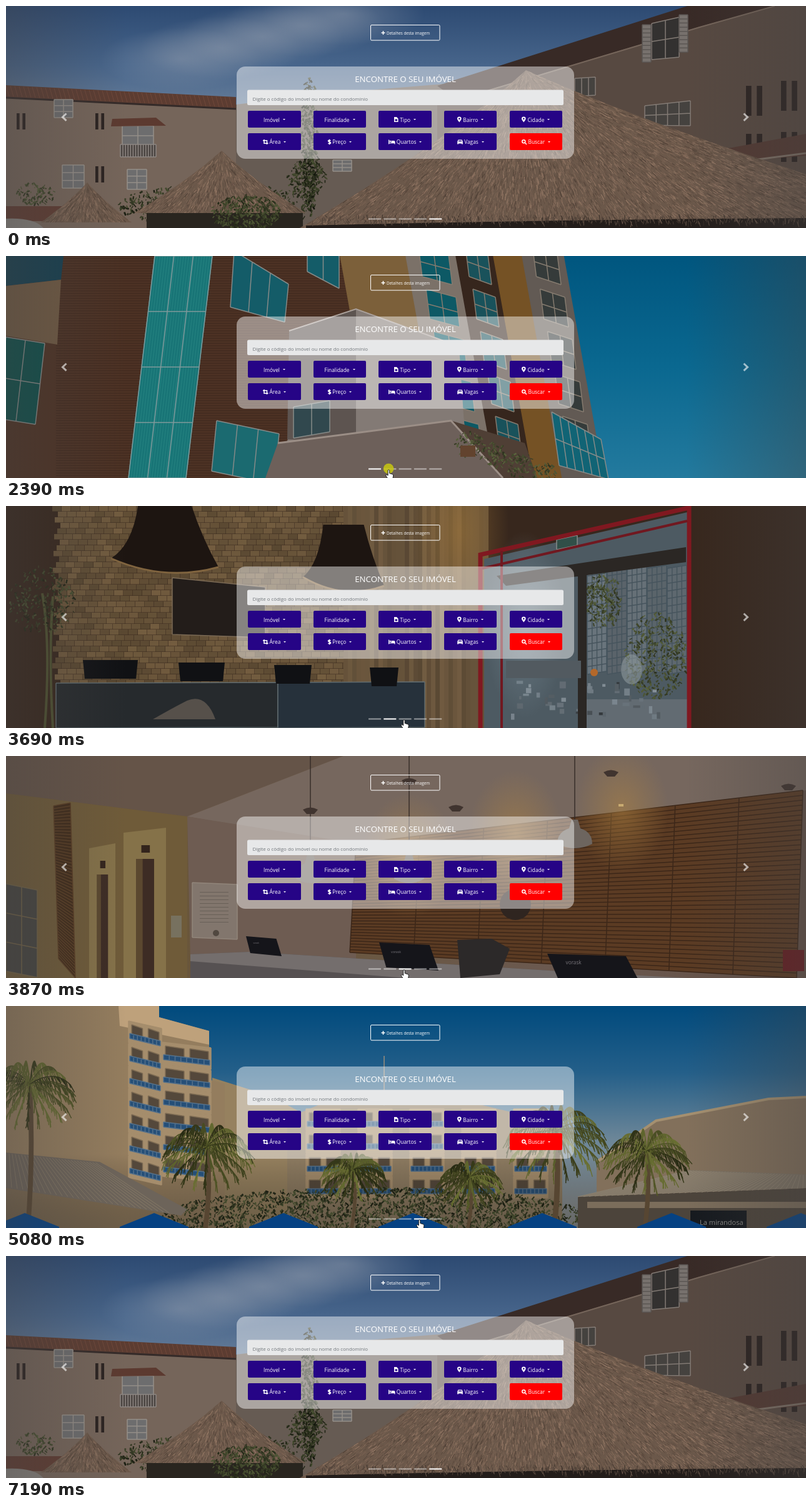
Animation, 1280 px wide and 356 px high, one loop 7.31 s. Source, as an HTML page with a canvas:

```html
<!DOCTYPE html>
<html lang="pt">
<meta charset="utf-8">
<style>
html, body { margin: 0; width: 100%; height: 100%; overflow: hidden; background: #333 }
body { font-family: "Open Sans", sans-serif; color: #fff }
canvas, svg, #form { position: absolute; left: 0; top: 0 }
text { fill: #fff }
#form { left: 387.3px; top: 168px; display: grid; grid-template: repeat(2, 26.8px) / repeat(5, 84.4px); gap: 9px 20.2px; font-size: 8.36px }
#form div { box-sizing: border-box; padding-top: 1.5px; border-radius: 2px; background: #260486; display: flex; align-items: center; justify-content: center; white-space: pre }
#form div:last-child { background: #f00 }
#form svg { position: static; overflow: visible; margin-right: 2.5px; fill: #fff }
#form div::after { content: ""; margin-left: 5px; border: solid transparent; border-width: 2.7px 2.7px 0; border-top-color: #fff }
</style>
<body>
<div id="slides"></div>
<svg width="1280" height="356">
  <rect x="583.5" y="30.5" width="110.5" height="24.5" rx="1.5" fill="none" stroke="#fff"/>
  <path d="M600.5 43h6M603.5 40v6" stroke="#fff" stroke-width="1.5"/>
  <text x="609" y="46" font-size="6.3">Detalhes desta imagem</text>
  <rect x="369" y="97" width="540" height="148" rx="14" fill="#fff" fill-opacity=".45"/>
  <text x="639" y="122" font-size="13.25" text-anchor="middle">ENCONTRE O SEU IMÓVEL</text>
  <rect x="386" y="134.5" width="506" height="24.5" rx="2.5" fill="#e7e8e9"/>
  <text x="394.5" y="152" font-size="7.87" style="fill:#71767b">Digite o código do imóvel ou nome do condomínio</text>
  <path d="M96.5 172.5l-6 5.7 6 5.7M1180.5 172.5l6 5.7-6 5.7" fill="none" stroke="#fff" stroke-opacity=".6" stroke-width="3"/>
  <g id="dots" fill="#fff"></g>
  <circle id="click" cy="341" r="8.3" fill="#c8c810" fill-opacity=".85"/>
  <path id="hand" d="M4 1Q5.3-.5 6.5 1V6l5 1.5Q13 8 12.5 10.5L11.5 16H5L1 10.5Q0 8 2 8L4 9.5Z" fill="#fff" stroke="#111" stroke-width=".9"/>
</svg>
<div id="form"></div>
<script>
const $ = id => document.getElementById(id);
let g, seed;
const rnd = () => (seed = seed * 16807 % 2147483647) / 2147483647;
const range = (a, b) => a + rnd() * (b - a);
const tone = (h, s, l, spread = 0) => `hsl(${h} ${s}% ${l + range(-spread, spread)}%)`;

// ---------- drawing helpers ----------
const fill = (c, d) => { g.fillStyle = c; g.fill(new Path2D(d)); };
const line = (c, w, d) => { g.strokeStyle = c; g.lineWidth = w; g.stroke(new Path2D(d)); };
const box = (c, x, y, w, h) => { g.fillStyle = c; g.fillRect(x, y, w, h); };
function fade(colors, x0, y0, x1, y1) {
  const grad = g.createLinearGradient(x0, y0, x1, y1);
  colors.forEach((c, i) => grad.addColorStop(i / (colors.length - 1), c));
  box(grad, 0, 0, 1280, 356);
}
function glow(c, x, y, rx, ry) {
  g.save(); g.translate(x, y); g.scale(rx, ry);
  const grad = g.createRadialGradient(0, 0, 0, 0, 0, 1);
  grad.addColorStop(0, c + '80'); grad.addColorStop(1, c + '00');
  box(grad, -1, -1, 2, 2); g.restore();
}
// Upright quad whose top and bottom edges drop by their own amounts, divided by lines
function pane(c, x, y, w, h, drop = 0, cols = 1, rows = 1, edge = '#858a88', lean = 0, bottomDrop = drop) {
  const at = (u, v) => `${x + w * u + lean * v} ${y + h * v + (drop + (bottomDrop - drop) * v) * u} `;
  fill(c, `M${at(0, 0)}${at(1, 0)}${at(1, 1)}${at(0, 1)}`);
  let d = '';
  for (let i = 0; i <= cols; i++) d += `M${at(i / cols, 0)}L${at(i / cols, 1)}`;
  for (let i = 0; i <= rows; i++) d += `M${at(0, i / rows)}L${at(1, i / rows)}`;
  line(edge, 1.5, d);
}
function repeat(n, draw) { for (let i = 0; i < n; i++) draw(i); }

// Leaf flecks gathered around a centre
function leaves(x, y, rx, ry, n, light = 17) {
  repeat(n, () => {
    const a = range(0, 6.28), r = Math.sqrt(rnd());
    line(tone(75, 24, light, 8), range(1, 3), `M${x + Math.cos(a) * r * rx} ${y + Math.sin(a) * r * ry}l${range(-5, 5)} ${range(1, 6)}`);
  });
}
function palm(x, y, r, foot) {
  line('#574632', r / 9, `M${x} ${y}Q${x + 6} ${(y + foot) / 2} ${x - 3} ${foot}`);
  repeat(24, i => {
    const a = i * .27, ex = Math.cos(a) * r, ey = Math.sin(a) * r * .65 + r * .25, my = ey - r * .4;
    let d = `M${x} ${y}q${ex * .6} ${my} ${ex} ${ey}`;
    for (let k = .1; k < 1; k += .04)
      d += `M${x + 1.2 * k * (1 - k) * ex + k * k * ex} ${y + 2 * k * (1 - k) * my + k * k * ey}l${range(-3, 3) + ex * .08} ${r * range(.1, .25)}`;
    line(tone(66, 38, 22, 10), 1.4, d);
  });
}
// Concave straw cone with strands running from the top to the eave
function thatch(x, y, left, right, base, n) {
  const edge = end => `${x + (end - x) * .35} ${y + (base - y) * .45}`;
  const d = `M${left} ${base}Q${edge(left)} ${x} ${y}Q${edge(right)} ${right} ${base}Z`;
  fill('#6b584a', d);
  g.save(); g.clip(new Path2D(d));
  repeat(n, () => {
    const dx = range(left, right) - x, dy = base - y, k = Math.sqrt(rnd()), l = range(4, 11) / Math.hypot(dx, dy);
    line(tone(24, 19, 38, 13), range(.5, 1.1), `M${x + dx * k} ${y + dy * k}l${dx * l + range(-2, 2)} ${dy * l}`);
  });
  g.restore();
}

// ---------- slides ----------
function tower() {
  fade(['#00567f', '#0a6890', '#237a9e'], 0, 0, 0, 356);
  box('#4d3224', 0, 0, 590, 356);
  for (let y = 0; y < 356; y += 4) line('#3d271d', 1, `M80 ${y}H590`);
  fill('#153f50', 'M0 0H92L88 38 0 48');
  fill('#705a43', 'M0 48 88 38 82 142 0 128');
  pane('#0d4f4b', 0, 130, 62, 130, 10, 2, 2, undefined, -15);
  pane('#187476', 238, 0, 92, 356, 0, 22, 1, '#227f7e', -42);
  pane('#0000', 238, 0, 92, 356, 0, 3, 4, '#7f999b', -42);
  pane('#145c68', 365, -8, 87, 90, 53, 3, 1, undefined, -6, 24);
  pane('#145c68', 482, -20, 51, 45, 20, 2, 1, undefined, 0, 27);
  pane('#1b6a70', 337, 264, 100, 81, 21, 3, 1, undefined, -8);
  // leaning façade: strips of wall, some with windows
  let x = 535;
  for (const [color, w, glass] of [['#7c603a', 105], ['#7b7168', 80, '#0d5965'], ['#36261d', 60, '#19525b'], ['#755225', 46], ['#625a54', 66, '#353b3a']]) {
    pane(color, x, 0, w, 356, 0, 1, 1, color, 64);
    if (glass) repeat(5, i => pane(glass, x + w * .25 + i * 12, i * 68 - 15, w * .6, 48, 13, 2, 2, '#857b6f', 6));
    x += w;
  }
  pane('#116475', 873, 250, 79, 86, 44, 6, 2, undefined, 12, 22);
  fill('#837a75', 'M453 120 560 85 725 145 735 300 560 356H420L453 290');
  fill('#5d5450', 'M453 120 560 85V300L450 294');
  line('#aaa09a', 2, 'M453 120 560 85 725 145');
  pane('#31484e', 460, 242, 58, 50, -10, 2, 1);
  fill('#4f3f35', 'M712 264 830 300 850 356H795');
  fill('#6d605a', 'M435 300 712 264 795 356H415');
  line('#9b8e86', 3, 'M435 300 712 264 795 356');
  repeat(4, i => leaves(742 + i * 40, 300 + i * 17, 22, 20, 70, 24));
  box('#62432e', 727, 304, 24, 18);
}

function lobby() {
  box('#37271d', 0, 0, 1280, 356);
  for (let y = 0; y < 285; y += 9)
    for (let x = 74; x < 540; x += 15) box(tone(34, 29, 31, 4), x + y % 14, y, 14.5, 8.5);
  for (let x = 540; x < 770; x += 7) box(tone(33, 27, 31, 4), x, 0, 8, 356);
  glow('#a77a38', 725, 40, 80, 190);
  pane('#231d1a', 266, 115, 149, 91, 15, 1, 1, '#7b6a55', 0, 5);
  for (const [x, y, w] of [[254, 92, 86], [540, 122, 65]]) {
    fill('#1d1511', `M${x - w * .5} ${y - 92}Q${x - w * .6} ${y - 30} ${x - w} ${y - 8}Q${x} ${y + 30} ${x + w} ${y + 6}Q${x + w * .7} ${y - 40} ${x + w * .5} ${y - 92}`);
    line('#80643f', 3, `M${x - w} ${y - 8}Q${x} ${y + 30} ${x + w} ${y + 6}`);
  }
  // street behind the glass
  fill('#4d5a62', 'M765 85 1090 10V356H765');
  repeat(5, i => pane(tone(205, 8, 41, 5), 930 + i * 32, 100, 31, 170, -5, 4, 14, '#46545d'));
  leaves(955, 150, 30, 45, 230, 23);
  leaves(1040, 240, 50, 70, 420, 23);
  box('#626b72', 925, 310, 165, 46);
  repeat(40, () => box(tone(205, 8, 40, 20), range(800, 1050), range(280, 340), range(3, 12), range(3, 12)));
  glow('#8296a2', 830, 190, 65, 150);
  fill('#2b2724', 'M785 112 1088 66V90L800 128M915 105h14V356H915');
  box('#525a60', 800, 248, 120, 28);
  fill('#8d989c99', 'M984 262a17 24 0 1 0 34 0a17 24 0 1 0-34 0');
  fill('#b4682a', 'M935 267a6 6 0 1 0 12 0a6 6 0 1 0-12 0');
  pane('#314f48', 881, 54, 33, 16, -7);
  line('#801820', 7, 'M759 356V78L1092 3M1093 0V356');
  line('#701820', 4, 'M793 356V72M762 100 1090 24');
  // plant and counter
  line('#4d5030', 4, 'M62 356Q72 220 58 140M75 356Q68 240 75 145');
  leaves(58, 150, 52, 55, 260, 19);
  pane('#262a2d', 80, 284, 355, 72, -1, 1, 1, '#5f6a6e');
  pane('#26313b', 435, 283, 235, 73, -1, 1, 1, '#5f6a6e');
  fill('#56504a', 'M235 342q35-20 55-30q30-12 45 30');
  repeat(4, i => fill('#101114', `M${123 + i * 153} ${247 + i * 4}h${88 - i * 14}l-3 30h${14 * i - 82}Z`));
}

function reception() {
  fade(['#69553a', '#69563b', '#6b594f', '#645249'], 0, 0, 1280, 0);
  fill('#655448', 'M0 0H540L290 97 0 60');
  fill('#76675e', 'M540 0H1280V55L560 145 290 97');
  fill('#6e5c52', 'M290 97 560 140V330H295');
  fill('#6f5b39', 'M0 60 290 97V356H0');
  pane('#402b19', 76, 80, 27, 245, -5, 1, 55, '#5a3e24', 8, 31);
  for (const [x, y, w] of [[133, 140, 42], [188, 115, 68]]) {
    fill('#857249', `M${x} ${y + 8} ${x + w} ${y}V356H${x}`);
    box('#3d2c24', x + w * .3, y + 50, w * .42, 356);
    box('#5b482f', x + w * .3, y + 50, w * .15, 356);
    box('#33241c', x + w * .42, y + 28, w * .2, 12);
  }
  pane('#454440', 0, 205, 50, 140, 10, 2, 3, '#6f6146');
  box('#77715f', 264, 256, 17, 35);
  pane('#82766d', 298, 203, 72, 88, 3, 1, 1, '#91857a');
  for (let y = 218; y < 270; y += 6) box('#685f57', 310, y, 46, 1);
  fill('#514840', 'M331 284a5 5 0 1 0 10 0a5 5 0 1 0-10 0');
  pane('#5b3b23', 560, 140, 715, 175, -85, 7, 38, '#3b2618', -10, 41);
  repeat(3, i => glow('#b28541', 645 + i * 170, 160 - i * 37, 75, 100));
  fill('#2f2520', 'M790 238a25 25 0 1 0 50 0a25 25 0 1 0-50 0');
  box('#c8aa71', 980, 77, 8, 4);
  for (const [x, y, r] of [[910, 124, 28], [487, 180, 23], [645, 180, 24]]) {
    line('#342a26', 1.4, `M${x} 0V${y}`);
    fill('#6d655f', `M${x - 5} ${y - 22}h10l4 14q${r - 9} 6 ${r - 9} 25q${-r} 14 ${-2 * r} 0q0-19 ${r - 9}-25Z`);
  }
  for (const [x, y] of [[487, 86], [645, 39], [720, 82], [968, 26], [1252, 48]]) fill('#40342f', `M${x - 12} ${y}q12-7 24 0l-6 7h-12Z`);
  fill('#565152', 'M295 318 390 314 900 346V356H295');
  fill('#746e6d', 'M295 318 390 314 900 346 1090 356H640L295 329');
  fill('#2c2929', 'M722 295 777 293 806 309 790 350 727 356');
  for (const [x, y, w, h] of [[384, 289, 57, 32], [597, 299, 95, 45], [866, 317, 148, 46]]) {
    fill('#15151a', `M${x} ${y} ${x + w * .85} ${y + 4} ${x + w} ${y + h} ${x + w * .12} ${y + h - 5}`);
    g.fillStyle = '#77747a'; g.font = `${w / 18}px "Open Sans", sans-serif`; g.fillText('vorask', x + w * .2, y + h * .38);
  }
  box('#671c20', 1243, 311, 34, 34);
}

function resort() {
  fade(['#004a7d', '#245f89', '#6c8698', '#8a9296'], 0, 0, 0, 320);
  const balconies = (x, y, w, n, drop) => repeat(n, i => {
    const top = y + i * 36;
    pane('#a58d6c', x, top, w, 35, drop, 1, 1, '#a58d6c');
    repeat(2, k => pane('#54483b', x + 5 + k * w / 2, top + 6 + k * drop / 2, w / 2 - 9, 15, drop / 2, 1, 1, '#7d6b53'));
    pane('#254f78', x + 2, top + 20, w - 4, 8, drop, 8, 1, '#54708a');
  });
  fill('#96815f', 'M330 115 425 145 480 175V356H330');
  fill('#8d7b61', 'M450 180 520 150 705 145 890 190V356H450');
  line('#9b8e7c', 1.5, 'M605 80V160');
  repeat(5, i => balconies(480 + i * 83, 165, 55, 4, 0));
  fill('#947d5e', 'M0 0H245V18L325 40V118L350 125V356H0Z');
  fade(['#0000', '#0000', '#0000', '#3a342b70'], 0, 0, 0, 356);
  fill('#bea17b', 'M180 0H245V18L325 40V62L182 32');
  balconies(196, 24, 53, 7, 12); balconies(250, 58, 78, 6, 9);
  fill('#82705b', 'M945 250 1040 185 1220 150 1280 146V356H945');
  line('#a59070', 4, 'M945 250 1040 184 1220 149 1280 146');
  leaves(590, 335, 340, 45, 2600, 17);
  fill('#6d645a', 'M0 235 150 250 290 326 280 336 0 292');
  for (let x = 0; x < 270; x += 9) line('#857966', 1, `M${x * .55} ${236 + x * .06}L${x} ${290 + x * .16}`);
  fill('#4c443b', 'M915 306 1280 292V356H915');
  fill('#7d7364', 'M915 306 1092 263 1280 270V292');
  for (let x = 0; x < 370; x += 9) line('#8f8371', 1, `M${1092 + x * .51} ${264 + x * .02}L${915 + x} ${306 - x * .038}`);
  box('#7b6d5b', 930, 314, 350, 10);
  box('#15191e', 1095, 328, 90, 28);
  g.fillStyle = '#8b8a86'; g.font = '11px "Open Sans", sans-serif'; g.fillText('La mirandosa', 1110, 351);
  for (const [x, y, r] of [[38, 125, 70], [322, 225, 70], [556, 262, 50], [742, 275, 50], [880, 200, 78], [1025, 232, 66]]) palm(x, y, r, 356);
  repeat(7, i => fill('#064283', `M${i * 207 - 25} 354l55-22 55 22v8h-110Z`));
}

function huts() {
  fade(['#2d4a72', '#47658b', '#71859e'], 0, 0, 0, 190);
  repeat(5, i => glow('#8c98aa', 280 + i * 65, 85 - i * 18, 130, 50));
  const window = (x, y, w, h) => pane('#6d6d6e', x, y, w, h, 0, 2, 3, '#948e88');
  const slots = (x, y, h) => repeat(2, i => box('#2a2220', x + i * h * .36, y, h * .18, h));
  // left wing
  fill('#75655a', 'M0 142 368 160V356H0');
  fill('#5c3c31', 'M0 127 368 146V164L0 146');
  for (let x = 0; x < 360; x += 7) line('#70483a', 1, `M${x} ${128 + x * .05}l5 17`);
  line('#342a28', 3, 'M0 147 368 165');
  fill('#665b53', 'M368 158 520 140 700 125V356H368');
  window(77, 150, 30, 29); window(90, 255, 35, 37); window(194, 262, 31, 32); window(186, 192, 50, 48);
  pane('#4b4542', 183, 222, 57, 20, 0, 14, 1, '#8d8682');
  fill('#5c3a30', 'M170 181 240 179 256 192 168 193');
  slots(17, 172, 26); slots(143, 172, 26); slots(143, 257, 26);
  // right wing
  fill('#574941', 'M690 140 1100 0H1280V356H690');
  fill('#382a26', 'M690 128 720 118 1090 0H1230L1110 33 720 150');
  line('#75655a', 2, 'M720 151 1110 34 1230 0');
  pane('#333130', 1033, 28, 44, 58, -10, 2, 2, '#827a74', 0, -4);
  for (const [x, y] of [[1018, 30], [1077, 14]]) pane('#77716d', x, y, 14, 60, 0, 1, 9, '#5b5653');
  pane('#45423f', 1022, 160, 73, 31, -8, 4, 2, '#827a74', 0, 1);
  pane('#45423f', 910, 116, 33, 29, -2, 3, 1, '#827a74');
  slots(1184, 128, 48); slots(1240, 120, 48); slots(1184, 205, 48); slots(1240, 202, 48);
  fill('#523932', 'M1135 232 1280 205V240L1195 247');
  line('#7d7065', 3, 'M1195 247 1280 236');
  window(523, 247, 30, 18);
  // greenery and thatched roofs
  leaves(486, 220, 12, 110, 450, 14);
  box('#5f3c32', 0, 321, 110, 24);
  leaves(340, 320, 160, 36, 700, 16);
  box('#29251f', 225, 328, 250, 28);
  thatch(345, 232, 205, 480, 332, 1500);
  thatch(130, 283, 56, 201, 347, 600);
  leaves(385, 330, 55, 28, 420, 20); leaves(482, 275, 30, 30, 160, 18); leaves(48, 300, 30, 18, 90, 22);
  thatch(832, 103, 470, 1560, 356, 13000);
  fill('#231d1a', 'M480 352Q900 342 1280 340V356H480');
  repeat(500, () => line(tone(24, 17, 28, 10), 1, `M${range(490, 1280)} ${range(334, 346)}l${range(-2, 4)} ${range(3, 9)}`));
  fill('#85817c', 'M0 341Q45 339 60 356H0');
}

const slides = [tower, lobby, reception, resort, huts].map((draw, i) => {
  const canvas = document.createElement('canvas');
  canvas.width = 1280; canvas.height = 356;
  g = canvas.getContext('2d'); seed = 97 + i * 131;
  draw();
  for (const x of [0, 1280]) fade(['#45424260', '#45424200'], x, 0, x ? 1088 : 192, 0);
  $('slides').append(canvas);
  return canvas;
});

// ---------- search form ----------
const outline = (w, d) => [w, `<path d="${d}" fill="none" stroke="#fff" stroke-width="1.5"/>`];
const solid = (w, d) => [w, `<path fill-rule="evenodd" d="${d}"/>`];
const pin = solid(6.6, 'M3.3 8.5Q0 4.500 0 2.800a3.300 3.300 0 0 1 6.600 0Q6.600 4.500 3.300 8.500ZM2 2.800a1.300 1.300 0 0 0 2.600 0a1.300 1.300 0 0 0-2.600 0');
const fields = {
  Imóvel: 0, Finalidade: 0, Tipo: solid(6.5, 'M0 0h4l2.500 2.500V8H0ZM1.500 3.500v3H5v-3Z'), Bairro: pin, Cidade: pin,
  Área: outline(8.5, 'M2 0V6.300H8.500M0 1.700H6.500V8'),
  Preço: outline(5, 'M4.600 2Q2.500.500 1 1.700T2.600 4T4 6.300T.4 6M2.500-.3V8.300'),
  Quartos: solid(10.5, 'M0 .5H1.200V5H4.500V2H8.500Q10.500 2 10.500 4V7.500H9.300V6.200H1.200V7.500H0ZM1.500 3a1.300 1.300 0 0 0 2.600 0a1.300 1.300 0 0 0-2.600 0'),
  Vagas: solid(9, 'M1.500.5h6L8.800 3.500V7.500H7V6.500H2V7.500H.2V3.500ZM2.300 1.700 1.700 3.300H7.300L6.700 1.700Z'),
  Buscar: outline(8.5, 'M.8 3.200a2.500 2.500 0 0 0 5 0a2.500 2.500 0 0 0-5 0M5 5l3 3')
};
$('form').innerHTML = Object.entries(fields).map(([label, icon]) =>
  `<div>${icon ? `<svg width="${icon[0]}" height="8">${icon[1]}</svg>` : ''}${label}</div>`).join('');
$('dots').innerHTML = slides.map((_, i) => `<rect x="${580 + i * 24.3}" y="340.5" width="20" height="2"/>`).join('');

// ---------- timeline ----------
const LOOP = 7310, PRESS = 120, LEAVE = 7130;
// pointer leaves for the next dot, arrives, slide changes
const visits = [[190, 670, 1100], [1280, 1840, 2510], [2760, 3360, 3870], [4110, 4590, 5080], [5260, 5880, 6250]];
const ease = (t, from, to) => { const k = Math.min(1, Math.max(0, (t - from) / (to - from))); return k * k * (3 - 2 * k); };

function render(now) {
  const t = now % LOOP;
  const active = (visits.filter(v => t >= v[2]).length + 4) % 5;
  slides.forEach((canvas, i) => {
    canvas.style.display = i === active ? 'block' : 'none';
    $('dots').children[i].setAttribute('opacity', i === active ? 1 : .5);
  });
  const x = 587.5 + 24.6 * visits.slice(1).reduce((sum, [from, to]) => sum + ease(t, from, to), 0);
  const y = 357 - 14.5 * (ease(t, 190, 670) - ease(t, LEAVE, LEAVE + 60));
  $('hand').setAttribute('transform', `translate(${x - 5} ${y})`);
  $('click').setAttribute('cx', x);
  $('click').style.display = visits.some(v => t >= v[2] - PRESS && t < v[2]) ? '' : 'none';
  requestAnimationFrame(render);
}
requestAnimationFrame(render);
</script>
</body>
</html>
```
